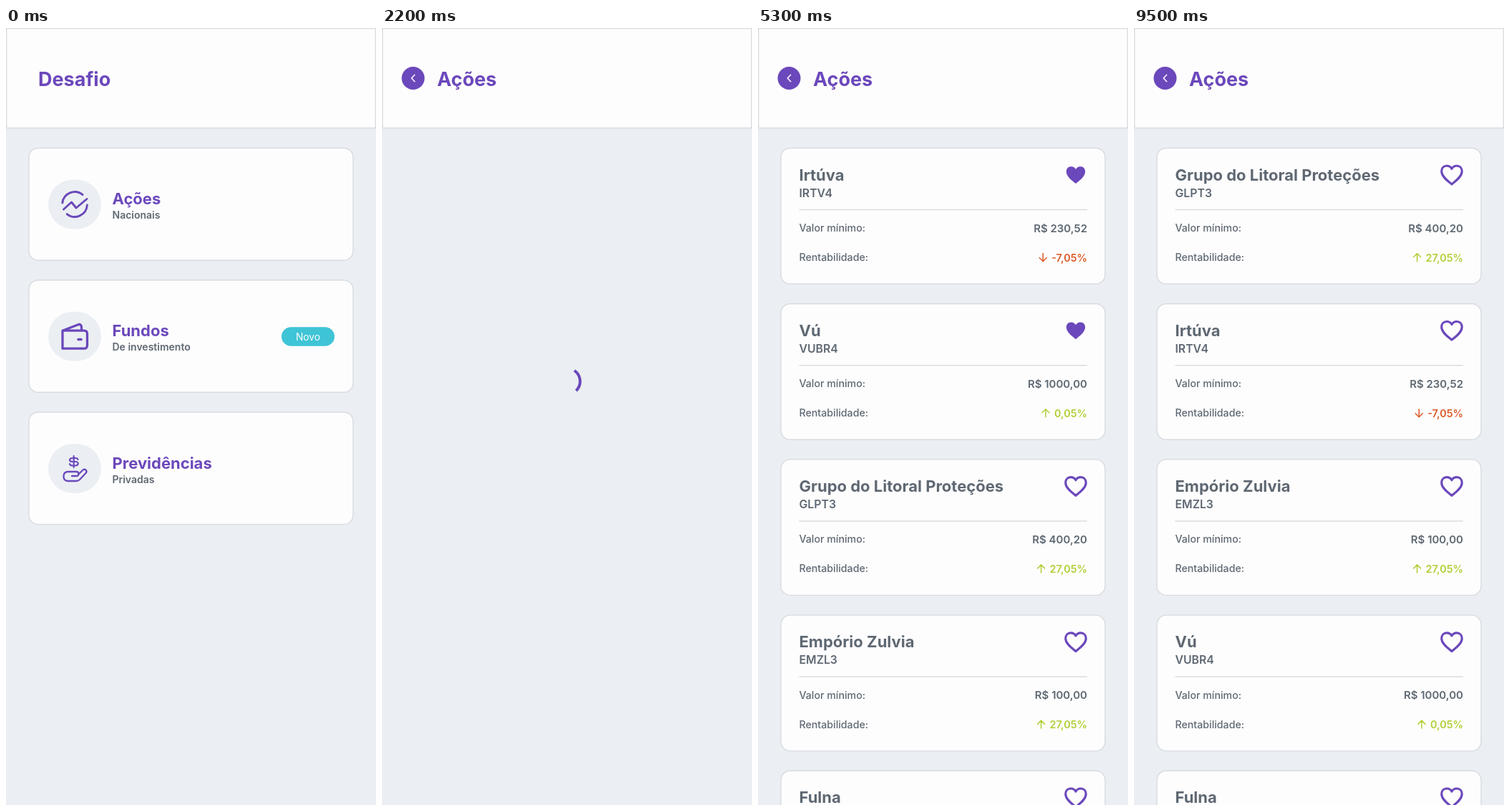
These frames come from a looping animation (517 px wide and 1084 px high, 9.6 s). An HTML page with a canvas:

```html
<!DOCTYPE html>
<html lang="pt-BR">
<head>
<meta charset="utf-8">
<style>
  html, body { margin: 0; width: 100%; height: 100%; overflow: hidden; background: #ebeff3; }
  canvas { display: block; }
</style>
</head>
<body>
<canvas id="stage" width="517" height="1084"></canvas>
<script>
const ctx = document.getElementById('stage').getContext('2d');
const W = 517, H = 1084, LOOP = 9600, STEP = 100;
const PURPLE = '#6b48bb', GREY = '#5e6872', BACK = '#ebeff3', PAPER = '#fefdfe',
  LINE = '#d8dce0', GREEN = '#afcf36', RED = '#db5a26', TEAL = '#3fc4d6';

// Timeline in ms
const OPEN_AT = 1268, LOADED_AT = 2500;
const CARD_TAP = [1000, 1150];
const HEART_TAPS = [
  { id: 3, down: 4300, up: 4500 },
  { id: 1, down: 5900, up: 6100 },
  { id: 3, down: 7440, up: 7700 }
];

const stocks = [
  { name: 'Grupo do Litoral Proteções', code: 'GLPT3', price: '400,20', gain: '27,05%' },
  { name: 'Irtúva', code: 'IRTV4', price: '230,52', gain: '-7,05%', favorite: true },
  { name: 'Empório Zulvia', code: 'EMZL3', price: '100,00', gain: '27,05%' },
  { name: 'Vú', code: 'VUBR4', price: '1000,00', gain: '0,05%' },
  { name: 'Fulna', code: 'FLNA3', price: '320,10', gain: '1,05%' }
].map((stock, id) => ({ ...stock, id }));

const clamp = x => Math.min(1, Math.max(0, x));
const easeQuad = x => x < .5 ? 2 * x * x : 1 - 2 * (1 - x) ** 2;
const easeCubic = x => x < .5 ? 4 * x ** 3 : 1 - 4 * (1 - x) ** 3;

function tapOpacity(t, down, up) {
  return t < up
    ? 1 - .8 * easeQuad(clamp((t - down) / 150))
    : .2 + .8 * easeQuad(clamp((t - up) / 250));
}

// Critically damped spring, 0 to 1
function spring(ms) {
  const x = Math.max(0, ms) * .01826;
  return 1 - Math.exp(-x) * (1 + x);
}

function text(str, x, y, size, weight, color, align = 'left') {
  ctx.font = `${weight} ${size}px Inter, "Open Sans", sans-serif`;
  ctx.textAlign = align;
  ctx.fillStyle = color;
  ctx.fillText(str, x, y);
  return ctx.measureText(str).width;
}

function box(x, y, w, h, r, fill, border) {
  ctx.beginPath();
  ctx.roundRect(x, y, w, h, r);
  ctx.fillStyle = fill;
  ctx.fill();
  if (border) stroke(border, 1.4);
}

function stroke(color, width, path) {
  ctx.strokeStyle = color;
  ctx.lineWidth = width;
  ctx.lineCap = ctx.lineJoin = 'round';
  path ? ctx.stroke(new Path2D(path)) : ctx.stroke();
}

function at(x, y, draw, alpha = 1) {
  ctx.save();
  ctx.translate(x, y);
  ctx.globalAlpha *= alpha;
  draw();
  ctx.restore();
}

function screen(title, titleX) {
  ctx.fillStyle = BACK;
  ctx.fillRect(0, 0, W, H);
  box(.7, .5, W - 1.4, 139, 0, PAPER, LINE);
  text(title, titleX, 81, 27, 700, PURPLE);
}

// Icons are drawn around their own centre
const icons = {
  chart() {
    stroke(PURPLE, 2.9, 'M-17.2-2A17.4 17.4 0 0 1 11-13.5M-10.8 13.6A17.4 17.4 0 0 0 17.4 1'
      + 'M-15.5 7L-4.5-3L2 5L17-7.5');
  },
  wallet() {
    stroke(PURPLE, 3.3, 'M-17-8H13Q17.5-8 17.5-3.5V12.5Q17.5 17 13 17H-17ZM-17-8L5-16.5Q9-17.5 9.5-13V-8');
    stroke(PURPLE, 3.6, 'M5 4.3H9');
  },
  hand() {
    stroke(PURPLE, 2.2, 'M-1.3-17.5V-1.5M4.5-12.5Q4-14.5 1-14.5H-3Q-7-14.5-7-11.8Q-7-9.5-3-9.5H.5'
      + 'Q4.7-9.5 4.7-7Q4.7-4 1-4H-3Q-6.5-4-7-6.5');
    stroke(PURPLE, 2.3, 'M-4 10.5H2Q5.5 10.5 5.5 7.5Q5.5 4.5 2 4.5H-9Q-15.5 4.5-15.5 11'
      + 'Q-15.5 17.5-9 17.5H2Q5 17.5 7 15.5L15.5 6.5Q17.5 4 15.5 2Q13 .3 11 2.5L5.5 8');
  }
};

function heart(filled) {
  const path = 'M0 12C-4 8.5-13.2 2.5-13.2-4.6C-13.2-9-10.3-11.8-6.6-11.8C-3.6-11.8-1.3-10.3 0-8'
    + 'C1.3-10.3 3.6-11.8 6.6-11.8C10.3-11.8 13.2-9 13.2-4.6C13.2 2.5 4 8.5 0 12Z';
  if (filled) {
    ctx.fillStyle = PURPLE;
    ctx.fill(new Path2D(path));
  } else {
    ctx.scale(1.08, 1.08);
    stroke(PURPLE, 2.9, path);
  }
}

function homeCard(y, title, subtitle, icon, isNew) {
  box(32, y, 453, 156.5, 13, PAPER, LINE);
  box(59, y + 44, 74, 69, 34.5, BACK);
  at(96, y + 78.5, icons[icon]);
  text(title, 148.5, y + 78.5, 22, 700, PURPLE);
  text(subtitle, 148.5, y + 98.5, 14, 600, GREY);
  if (!isNew) return;
  box(385, y + 65.5, 74, 26.5, 13.25, TEAL);
  text('Novo', 422, y + 84, 13.8, 400, PAPER, 'center');
}

function home(t) {
  screen('Desafio', 45);
  at(0, 0, () => homeCard(167.5, 'Ações', 'Nacionais', 'chart'), tapOpacity(t, ...CARD_TAP));
  homeCard(351.7, 'Fundos', 'De investimento', 'wallet', true);
  homeCard(536, 'Previdências', 'Privadas', 'hand');
}

function stockCard(y, stock, favorite, heartAlpha) {
  const right = 460, falling = stock.gain[0] === '-', color = falling ? RED : GREEN;
  box(32, y, 453, 189.5, 13, PAPER, LINE);
  text(stock.name, 57.5, y + 45, 22, 700, GREY);
  text(stock.code, 57.5, y + 68, 15.8, 600, GREY);
  at(444, y + 37.5, () => heart(favorite), heartAlpha);
  ctx.fillStyle = LINE;
  ctx.fillRect(57.5, y + 85.3, 402.5, 1.4);
  text('Valor mínimo:', 57.5, y + 116.5, 14.2, 500, GREY);
  text('R$ ' + stock.price, right, y + 117, 15, 600, GREY, 'right');
  text('Rentabilidade:', 57.5, y + 157.5, 14.2, 500, GREY);
  const width = text(stock.gain, right, y + 158, 14.4, 600, color, 'right');
  at(right - width - 12, y + 152.5, () => {
    if (falling) ctx.scale(1, -1);
    stroke(color, 1.5, 'M0 5.5V-5.5M-5-.5L0-5.5L5-.5');
  });
}

function stockList(t) {
  const favorites = stocks.map(stock => !!stock.favorite);
  const alphas = stocks.map(() => 1);
  for (const { id, down, up } of HEART_TAPS) {
    if (t >= up) favorites[id] = !favorites[id];
    alphas[id] = Math.min(alphas[id], tapOpacity(t, down, up));
  }
  [...stocks]
    .sort((a, b) => favorites[b.id] - favorites[a.id])
    .forEach((stock, row) => stockCard(167.5 + row * 217.2, stock, favorites[stock.id], alphas[stock.id]));
}

function spinner(t) {
  const turns = (t - 2200) / 1332;
  const phase = ((turns + .2276) % 1 + 1) % 1;
  const cycle = Math.floor(turns + .2276);
  const tail = .75 * easeCubic(clamp(2 * phase - 1));
  const head = .75 * easeCubic(clamp(2 * phase));
  const base = -56 / 360 + turns * .65 + cycle * .75;
  ctx.beginPath();
  ctx.arc(258.5, 493, 18.3, (base + tail) * 2 * Math.PI, (base + Math.max(head, tail + .02)) * 2 * Math.PI);
  ctx.lineCap = 'butt';
  ctx.lineWidth = 4;
  ctx.strokeStyle = PURPLE;
  ctx.stroke();
}

function detail(t) {
  screen('Ações', 77);
  box(27.5, 54, 32, 32, 16, PURPLE);
  stroke(PAPER, 1.5, 'M45.7 65.2L41.2 70L45.7 74.8');
  t < LOADED_AT ? spinner(t) : stockList(t);
}

function render(t) {
  const p = t < OPEN_AT + 500 ? spring(t - OPEN_AT) : 1;
  ctx.clearRect(0, 0, W, H);
  if (p < 1) {
    at(-.3 * W * p, 0, () => home(t));
    ctx.fillStyle = `rgba(0, 0, 0, ${.1 * p})`;
    ctx.fillRect(0, 0, W, H);
  }
  if (p > 0) at(W * (1 - p), 0, () => detail(t));
}

function tick() {
  const t = performance.now() % LOOP;
  render(Math.floor(t / STEP) * STEP);
  requestAnimationFrame(tick);
}
tick();
</script>
</body>
</html>
```
